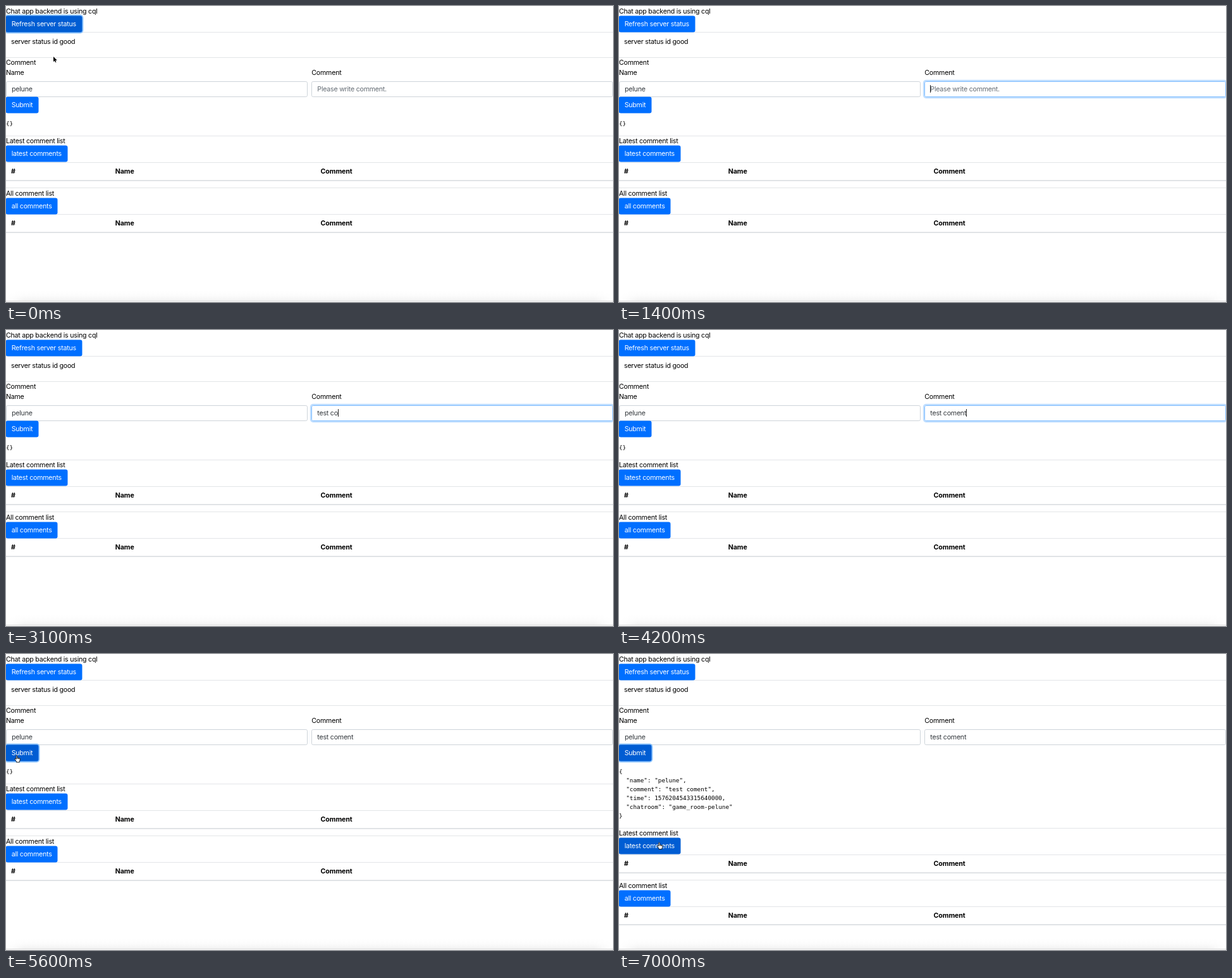
Write an HTML page that moves like this. It is 960x468 px and loops after 7100 ms.

```html
<!DOCTYPE html>
<html lang="en">
<head>
<meta charset="utf-8">
<title>Chat app</title>
<style>
html, body { margin: 0; width: 100%; height: 100%; overflow: hidden; background: #fff; }
#stage { position: absolute; left: 0; top: 0; width: 960px; height: 468px; overflow: hidden;
  font: 10.67px/16px Inter, "Open Sans", sans-serif; letter-spacing: -.023em; color: #000; }
#stage > *, #lower > * { position: absolute; white-space: pre; box-sizing: border-box; }
#lower { left: 0; top: 0; width: 960px; height: 0; }
#stage .btn { --fill: #006fff; left: 0; height: 25px; padding-left: 8.67px; line-height: 25.33px; color: #fff;
  z-index: 1; background: var(--fill); border-radius: 2.67px; box-shadow: 0 0 0 .5px var(--fill); }
#stage .btn.dark { --fill: #005dd3; }
#stage .btn.focus { --fill: #005dd3; box-shadow: 0 0 0 .5px var(--fill), 0 0 0 2.4px rgba(38, 143, 255, .5); }
.rule { left: 0; width: 960px; height: 1px; background: #e3e5e8; }
.thick { height: 2px; background: #e0e3e6; }
.th { font-weight: 700; letter-spacing: -.008em; }
.field { top: 118.67px; width: 476.67px; height: 25.33px; padding-left: 8px; line-height: 23.6px;
  border: 1px solid #ced4da; border-radius: 2.67px; color: #33383d; }
.field.focus { border-color: #80bdff; box-shadow: 0 0 0 2.13px rgba(0, 123, 255, .25); }
.hint { color: #646c74; }
.caret { display: inline-block; width: 1px; height: 12px; margin-right: -1px; vertical-align: -2.5px; background: #222; }
.typo { text-decoration: underline dotted #777 1px; text-underline-offset: 2px; }
#badge { left: 456px; top: 124px; width: 15px; height: 15px; border-radius: 50%; background: #4a86cf; }
#out { left: 0; top: 179px; margin: 0; font: 9.33px/14px "DejaVu Sans Mono", monospace; letter-spacing: 0; }
#shade { left: 0; top: 450px; width: 960px; height: 16px;
  background: linear-gradient(#fff, #fcfcfc 50%, #f2f2f2);
  -webkit-mask: linear-gradient(90deg, transparent, #000 30px, #000 930px, transparent);
  mask: linear-gradient(90deg, transparent, #000 30px, #000 930px, transparent); }
#cursor { left: 0; top: 0; width: 1px; height: 1px; overflow: visible; z-index: 2; }
</style>
</head>
<body>
<div id="stage">
  <div style="left:0;top:.5px">Chat app backend is using cql</div>
  <div class="btn" id="refresh" style="top:16px;width:120px">Refresh server status</div>
  <div class="rule" style="top:41px"></div>
  <div style="left:8px;top:48.5px">server status id good</div>
  <div class="rule" style="top:81px"></div>
  <div style="left:0;top:82.2px">Comment</div>
  <div style="left:0;top:98.2px">Name</div>
  <div style="left:483.33px;top:98.2px">Comment</div>
  <div class="field" id="name" style="left:0"></div>
  <div id="badge"></div>
  <div class="field" id="comment" style="left:483.33px"></div>
  <div class="btn" id="submit" style="top:144px;width:51px">Submit</div>
  <pre id="out"></pre>
  <div id="lower">
    <div class="rule" style="top:205px"></div>
    <div style="left:0;top:205.5px">Latest comment list</div>
    <div class="btn" id="latest" style="top:221.33px;width:97px">latest comments</div>
    <div class="rule" style="top:247px"></div>
    <div class="th" style="left:8px;top:253.5px">#</div>
    <div class="th" style="left:172.7px;top:253.5px">Name</div>
    <div class="th" style="left:497.5px;top:253.5px">Comment</div>
    <div class="rule thick" style="top:275px"></div>
    <div class="rule" style="top:287px"></div>
    <div style="left:0;top:288.5px">All comment list</div>
    <div class="btn" style="top:304px;width:81px">all comments</div>
    <div class="rule" style="top:329px"></div>
    <div class="th" style="left:8px;top:336px">#</div>
    <div class="th" style="left:172.7px;top:336px">Name</div>
    <div class="th" style="left:497.5px;top:336px">Comment</div>
    <div class="rule thick" style="top:357px"></div>
  </div>
  <div id="shade"></div>
  <div class="rule" style="top:466px;background:#dedede"></div>
  <svg id="cursor">
    <path id="arrow" d="M0 0V8.2L1.9 6.4L3.2 9.3L4.5 8.7L3.2 5.9H5.8Z" fill="#000" stroke="#fff" stroke-width=".8" paint-order="stroke"/>
    <path id="beam" d="M-2 -4.6Q0 -4.6 0 -3.4Q0 -4.6 2 -4.6M0 -3.6V3.6M-2 4.6Q0 4.6 0 3.4Q0 4.6 2 4.6M-1 .9H1" fill="none" stroke="#111" stroke-width="1"/>
    <path id="hand" d="M-.9 .6Q0 -.5 .9 .6V3.9Q1.7 3.1 2.5 4.1Q3.4 3.4 4.1 4.5Q5.3 4 5.4 5.4Q5.4 7.7 4.4 9V10.6H-.6V9.2L-3 6Q-3.4 4.6 -2 4.8L-.9 6ZM.9 3.9V5.4M2.5 4.1V5.6M4.1 4.5V5.8" fill="#fff" stroke="#111" stroke-width=".9"/>
  </svg>
</div>
<script>
const LOOP = 7100, STEP = 100;
const USER = "pelune", MESSAGE = "test coment";
const KEYS = [2300, 2400, 2500, 2700, 2800, 2900, 3100, 3300, 3500, 3700, 3900];
const NAME_AT = 600, COMMENT_AT = 1400, MOUSE_AT = 4900, CLICK_AT = 5500, REPLY_AT = 5700;
// time, x, y of the pointer's hot spot
const PATH = [[100, 75, 80], [600, 157, 131.5], [4800, 157, 131.5], [5200, 15, 152],
  [5500, 17, 160.5], [6400, 17, 160.5], [6900, 63.5, 298]];
const REPLY = JSON.stringify({ name: USER, comment: MESSAGE, time: 0, chatroom: "game_room-" + USER }, null, 2)
  .replace('"time": 0', '"time": 1576204543315640000');

const $ = id => document.getElementById(id);
const flag = (id, cls, on) => $(id).classList.toggle(cls, on);

function pointer(t) {
  let a = PATH[0];
  for (const b of PATH) {
    if (t < b[0]) {
      const u = Math.max(0, (t - a[0]) / (b[0] - a[0])), e = u * u * (3 - 2 * u);
      return [a[1] + (b[1] - a[1]) * e, a[2] + (b[2] - a[2]) * e];
    }
    a = b;
  }
  return [a[1], a[2]];
}

function pointerKind(x, y, t) {
  if (t >= COMMENT_AT && t < MOUSE_AT) return "";
  if (y > 118 && y < 144) return "beam";
  if (y >= 144 && y < 169.5 && x < 51.5) return "hand";
  if (t >= REPLY_AT) {
    if (y > 291 && y < 317 && x < 97.5) return "hand";
    if (y > 179 && y < 264) return "beam";
  }
  return "arrow";
}

const caret = since => since % 1000 < 500 ? '<i class="caret"></i>' : "";

function commentText(t, focused) {
  const typed = KEYS.filter(k => k <= t);
  const blink = focused ? caret(t - (typed.length ? typed[typed.length - 1] : COMMENT_AT)) : "";
  if (!typed.length) return blink + '<span class="hint">Please write comment.</span>';
  const text = MESSAGE.slice(0, typed.length);
  const marked = focused && t >= 4400 ? text.replace("coment", '<span class="typo">$&</span>') : text;
  return marked + blink;
}

function draw(t) {
  const inName = t >= NAME_AT && t < COMMENT_AT;
  const inComment = t >= COMMENT_AT && t < CLICK_AT;
  const replied = t >= REPLY_AT;
  flag("refresh", "focus", t < NAME_AT);
  flag("name", "focus", inName);
  flag("comment", "focus", inComment);
  flag("submit", "dark", t > 5200);
  flag("submit", "focus", t >= CLICK_AT);
  $("badge").style.display = inName ? "" : "none";
  $("name").innerHTML = USER + (inName ? caret(t - NAME_AT) : "");
  $("comment").innerHTML = commentText(t, inComment);
  $("out").textContent = replied ? REPLY : "{}";
  $("lower").style.top = replied ? "70px" : "0";

  const [x, y] = pointer(t), kind = pointerKind(x, y, t);
  flag("latest", "dark", replied && kind === "hand" && y > 200);
  $("cursor").style.transform = `translate(${x}px, ${y}px)`;
  for (const id of ["arrow", "beam", "hand"]) $(id).style.display = id === kind ? "" : "none";
}

let last = -1;
const start = performance.now();
function tick() {
  const t = Math.floor((performance.now() - start) % LOOP / STEP) * STEP;
  if (t !== last) draw(last = t);
  requestAnimationFrame(tick);
}
tick();
</script>
</body>
</html>
```
